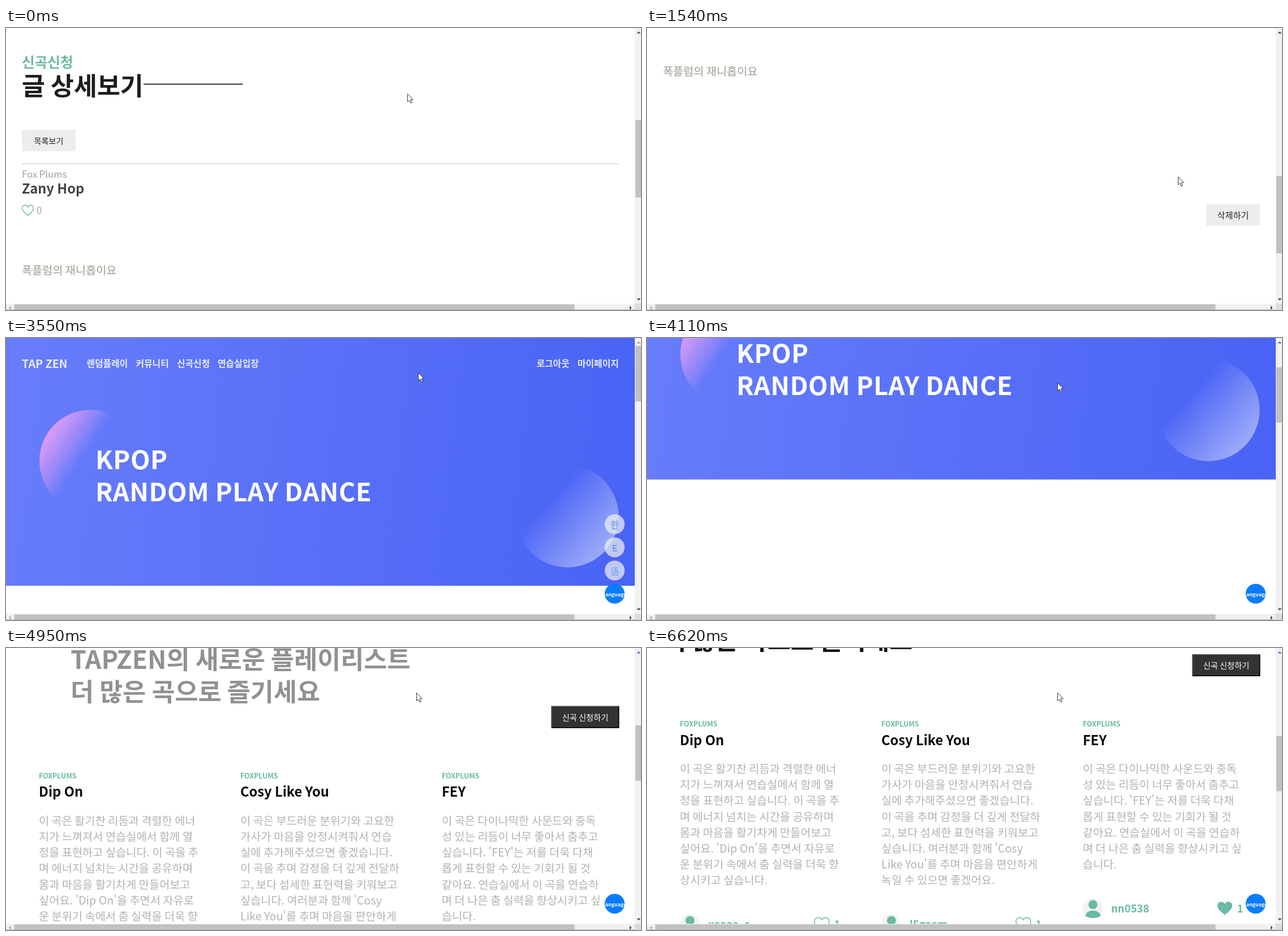
Animation, 1122 px wide and 499 px high, one loop 6.69 s. Source, as an HTML page with a canvas:

```html
<!DOCTYPE html>
<html lang="ko">
<head>
<meta charset="utf-8">
<title>글 상세보기</title>
<style>
html, body { margin: 0; width: 100%; height: 100%; overflow: hidden; background: #fff; }
canvas { display: block; width: 1122px; height: 499px; }
</style>
</head>
<body>
<canvas id="stage" width="1122" height="499"></canvas>
<script>
const c = document.getElementById('stage').getContext('2d');
const LOOP = 6690;
const KR = '"Noto Sans CJK KR", "Noto Sans CJK SC", "Noto Sans", sans-serif';
const GREEN = '#6abaa5';
const CLICKS = [[2030, 2160], [3050, 3200]];
const DIALOG = [2150, 3270];
const HOME_AT = 3340;

const cards = [
  { x: 58, title: 'Dip On', user: 'xoaaa_r', liked: false, lines: [
    '이 곡은 활기찬 리듬과 격렬한 에너', '지가 느껴져서 연습실에서 함께 열',
    '정을 표현하고 싶습니다. 이 곡을 추', '며 에너지 넘치는 시간을 공유하며',
    '몸과 마음을 활기차게 만들어보고', "싶어요. 'Dip On'을 추면서 자유로",
    '운 분위기 속에서 춤 실력을 더욱 향', '상시키고 싶습니다.'] },
  { x: 414, title: 'Cosy Like You', user: 'l5gaem', liked: false, lines: [
    '이 곡은 부드러운 분위기와 고요한', '가사가 마음을 안정시켜줘서 연습',
    '실에 추가해주셨으면 좋겠습니다.', '이 곡을 추며 감정을 더 깊게 전달하',
    '고, 보다 섬세한 표현력을 키워보고', "싶습니다. 여러분과 함께 'Cosy",
    "Like You'를 추며 마음을 편안하게", '녹일 수 있으면 좋겠어요.'] },
  { x: 770, title: 'FEY', user: 'nn0538', liked: true, lines: [
    '이 곡은 다이나믹한 사운드와 중독', '성 있는 리듬이 너무 좋아서 춤추고',
    "싶습니다. 'FEY'는 저를 더욱 다채", '롭게 표현할 수 있는 기회가 될 것',
    '같아요. 연습실에서 이 곡을 연습하', '며 더 나은 춤 실력을 향상시키고 싶',
    '습니다.'] }
];

const clamp = v => Math.max(0, Math.min(1, v));
const smooth = u => u * u * (3 - 2 * u);
const linear = u => u;

// Value at time t along [time, value] keys.
function track(t, keys, ease) {
  let i = 0;
  while (i < keys.length - 2 && t > keys[i + 1][0]) i++;
  const [t0, a] = keys[i], [t1, b] = keys[i + 1];
  return a + (b - a) * ease(clamp((t - t0) / (t1 - t0)));
}

const scrollPost = t => track(t, [[860, 0], [1400, 352]], smooth);
const scrollHome = t => track(t, [[3740, 0], [4530, 400.5], [4950, 610.5], [5350, 702.5]], linear);
const cursorX = t => track(t, [[130, 709], [200, 713], [1050, 713], [1540, 938], [1760, 1103],
  [1980, 1043], [2230, 1043], [2800, 730], [3270, 730], [3550, 728], [4100, 725]], smooth);
const cursorY = t => track(t, [[130, 116], [200, 123], [1050, 123], [1540, 263], [1760, 366],
  [1980, 344], [2230, 344], [2800, 58], [3270, 58], [3550, 61], [4100, 79]], smooth);

// y is the middle of the capitals or syllable blocks.
function text(str, x, y, size, color, weight = 400, align = 'left', space = 0) {
  c.font = `${weight} ${size}px ${KR}`;
  c.textAlign = align;
  c.letterSpacing = space + 'px';
  c.fillStyle = color;
  c.fillText(str, x, y + size * 0.385);
}

function rect(x, y, w, h, color) {
  c.fillStyle = color;
  c.fillRect(x, y, w, h);
}

function disc(x, y, r, fill) {
  c.beginPath();
  c.arc(x, y, r, 0, Math.PI * 2);
  c.fillStyle = fill;
  c.fill();
}

function round(x, y, w, h, r, color) {
  c.beginPath();
  c.roundRect(x, y, w, h, r);
  c.fillStyle = color;
  c.fill();
}

function poly(points, color) {
  c.beginPath();
  points.forEach(([x, y]) => c.lineTo(x, y));
  c.closePath();
  c.fillStyle = color;
  c.fill();
}

function gradient(x0, y0, x1, y1, from, to) {
  const g = c.createLinearGradient(x0, y0, x1, y1);
  g.addColorStop(0, from);
  g.addColorStop(1, to);
  return g;
}

function heart(x, y, w, filled) {
  c.save();
  c.translate(x, y);
  c.scale(w / 20, w / 20);
  c.beginPath();
  c.moveTo(0, 9);
  c.bezierCurveTo(-4, 5.5, -10, 1.5, -10, -3.6);
  c.bezierCurveTo(-10, -9.4, -2.6, -11, 0, -5.8);
  c.bezierCurveTo(2.6, -11, 10, -9.4, 10, -3.6);
  c.bezierCurveTo(10, 1.5, 4, 5.5, 0, 9);
  c.closePath();
  c.restore();
  if (filled) {
    c.fillStyle = GREEN;
    c.fill();
  } else {
    c.strokeStyle = GREEN;
    c.lineWidth = 1.5;
    c.stroke();
  }
}

function drawPost(s) {
  c.save();
  c.translate(0, -s);
  text('신곡신청', 28, 61, 24.64, GREEN, 700);
  text('글 상세보기', 28, 102, 44.5, '#1d1d1d', 700);
  rect(243, 98.5, 175.5, 1.8, '#1d1d1d');
  rect(28, 180, 95, 38, '#ededed');
  text('목록보기', 75.5, 199.5, 14.08, '#222', 400, 'center');
  rect(28, 239.3, 1055, 1.4, '#d0d0d0');
  text('Fox Plums', 28, 259, 16.7, '#a3a19d', 500);
  text('Zany Hop', 28, 283.5, 23.7, '#444', 700);
  heart(38.5, 322.5, 20, false);
  text('0', 54, 323, 16.7, '#a3a19d');
  text('폭플럼의 재니홉이요', 28, 428, 19.7, '#a09b91');
  rect(988, 663, 95, 39, '#ededed');
  text('삭제하기', 1035.5, 683, 15.2, '#222', 400, 'center');
  c.restore();
}

function drawDialog(alpha) {
  c.save();
  c.globalAlpha = alpha;
  c.shadowColor = 'rgba(0,0,0,.45)';
  c.shadowBlur = 4;
  c.shadowOffsetY = 1;
  round(366, -20, 394, 102.5, 4, '#fff');
  c.shadowColor = 'transparent';
  text('해당 게시글이 삭제되었습니다.', 380.5, 17, 12.6, '#222');
  round(688.5, 39.5, 58.5, 30, 4, '#2475de');
  round(690.3, 41.3, 54.9, 26.4, 3, '#fff');
  round(691.5, 42.5, 52.5, 24, 2, '#2878df');
  text('확인', 718, 54, 11.5, '#fff', 400, 'center');
  c.restore();
}

function drawHero() {
  rect(0, 0, 1111, 438.5, gradient(0, 150, 1111, 290, '#677dfa', '#4963f5'));
  disc(149.5, 217.5, 90.5, gradient(74, 167, 138, 210, 'rgba(228,158,246,.95)', 'rgba(228,158,246,0)'));
  disc(992, 315.5, 90.5, gradient(960, 288, 1061, 374, 'rgba(255,255,255,0)', 'rgba(255,255,255,.46)'));
  const soft = 'rgba(255,255,255,.86)';
  text('TAP ZEN', 28, 45, 19.7, soft, 700);
  text('랜덤플레이', 142.5, 45, 15.84, soft, 700);
  text('커뮤니티', 229.5, 45, 15.84, soft, 700);
  text('신곡신청', 302, 45, 15.84, soft, 700);
  text('연습실입장', 374, 45, 15.84, soft, 700);
  text('로그아웃', 937.5, 45, 15.84, soft, 700);
  text('마이페이지', 1010, 45, 15.84, soft, 700);
  text('KPOP', 158, 215, 45, '#fff', 700, 'left', 0.5);
  text('RANDOM PLAY DANCE', 158, 271.5, 45, '#fff', 700, 'left', 0.5);
}

function drawHeading(t) {
  const left = (1 - clamp((t - 4310) / 2400)) ** 2;
  const x = 28 + 160 * left;
  c.save();
  c.globalAlpha = 1 - left;
  text("THE NEW TAPZEN’S PLAYLIST", x, 588.7, 25.05, GREEN, 700);
  text('TAPZEN의 새로운 플레이리스트', x, 631, 44.65, '#111', 700);
  text('더 많은 곡으로 즐기세요', x, 688, 44.65, '#111', 700);
  c.restore();
}

function drawCard({ x, title, user, liked, lines }) {
  text('FOXPLUMS', x, 836.5, 12.4, GREEN, 700);
  text(title, x, 865, 23.7, '#0a0a0a', 700);
  lines.forEach((line, i) => text(line, x, 916 + i * 28.16, 19.75, '#b2b2b2'));

  const y = 966 + lines.length * 28.16;
  disc(x + 17.5, y, 17.5, '#f2f2f2');
  disc(x + 18, y - 6.5, 8, GREEN);
  c.beginPath();
  c.ellipse(x + 18, y + 14, 13.5, 10, 0, Math.PI, 0);
  c.quadraticCurveTo(x + 18, y + 21, x + 4.5, y + 14);
  c.fillStyle = GREEN;
  c.fill();
  text(user, x + 50, y, 18.5, GREEN, 700);
  heart(x + 251, y, 26, liked);
  text('1', x + 272.5, y, 18.5, GREEN, 700);
}

function drawRequestButton() {
  rect(963.5, 713.5, 120, 39, '#000');
  poly([[963.5, 752.5], [963.5, 713.5], [1083.5, 713.5], [1081.7, 715.3], [965.3, 715.3], [965.3, 750.7]], '#555');
  rect(965.3, 715.3, 116.4, 35.4, '#333');
  text('신곡 신청하기', 1023.5, 733, 14.2, '#fff', 500, 'center');
}

function drawLanguage(t) {
  const alpha = 0.72 * (1 - clamp((t - 3570) / 200));
  if (alpha > 0) {
    c.save();
    c.globalAlpha = alpha;
    ['한', 'E', '语'].forEach((s, i) => {
      const y = 329.5 + i * 41;
      disc(1075.5, y, 17.6, '#f0f0f2');
      text(s, 1075.5, y + 1, 15.8, '#4a90f0', i < 2 ? 700 : 400, 'center');
    });
    c.restore();
  }
  c.save();
  disc(1075.5, 452.5, 17.6, '#0a7cfb');
  c.clip();
  text('Language', 1075, 453.5, 8.8, '#fff', 700, 'center');
  c.restore();
}

function drawHome(t, s) {
  c.save();
  c.translate(0, -s);
  drawHero();
  drawHeading(t);
  drawRequestButton();
  cards.forEach(drawCard);
  c.restore();
  drawLanguage(t);
}

function drawBars(top, height, upColor) {
  rect(1111, 0, 11, 488, '#f1f1f1');
  rect(1112, top, 10, height, '#c1c1c1');
  poly([[1114.5, 9.5], [1118, 6], [1121.5, 9.5]], upColor);
  poly([[1114.5, 478.5], [1118, 482], [1121.5, 478.5]], '#444');
  rect(0, 488, 1111, 11, '#f1f1f1');
  rect(14.5, 489, 990, 9.5, '#c1c1c1');
  rect(0, 498, 1111, 1, '#b4b4b4');
  poly([[8.5, 491.5], [5, 495], [8.5, 498.5]], '#a3a3a3');
  poly([[1102, 491.5], [1105.5, 495], [1102, 498.5]], '#444');
  rect(1111, 488, 11, 11, '#dcdcdc');
}

function drawCursor(t) {
  const x = cursorX(t), y = cursorY(t);
  const arrow = [[0, 0], [0, 14], [3.2, 11.2], [5.6, 16.4], [7.7, 15.5], [5.5, 10.4], [10, 10.2]];
  poly(arrow.map(([dx, dy]) => [x + 0.5 + dx, y + 0.5 + dy]), '#fff');
  c.strokeStyle = '#222';
  c.lineWidth = 0.9;
  c.stroke();
  if (CLICKS.some(([a, b]) => t >= a && t < b)) disc(x, y, 11, 'rgba(245,230,20,.5)');
}

function draw(t) {
  rect(0, 0, 1122, 499, '#fff');
  if (t < HOME_AT) {
    const s = scrollPost(t);
    drawPost(s);
    drawBars(163 + s * 0.2812, 137, '#444');
    if (t >= DIALOG[0] && t < DIALOG[1]) drawDialog(clamp((t - DIALOG[0]) / 100));
  } else {
    const s = scrollHome(t);
    drawHome(t, s);
    drawBars(14 + s * 0.2013, 98, s > 0 ? '#4b5ff0' : '#a3a3a3');
  }
  drawCursor(t);
}

function tick() {
  draw(performance.now() % LOOP);
  requestAnimationFrame(tick);
}
tick();
</script>
</body>
</html>
```
